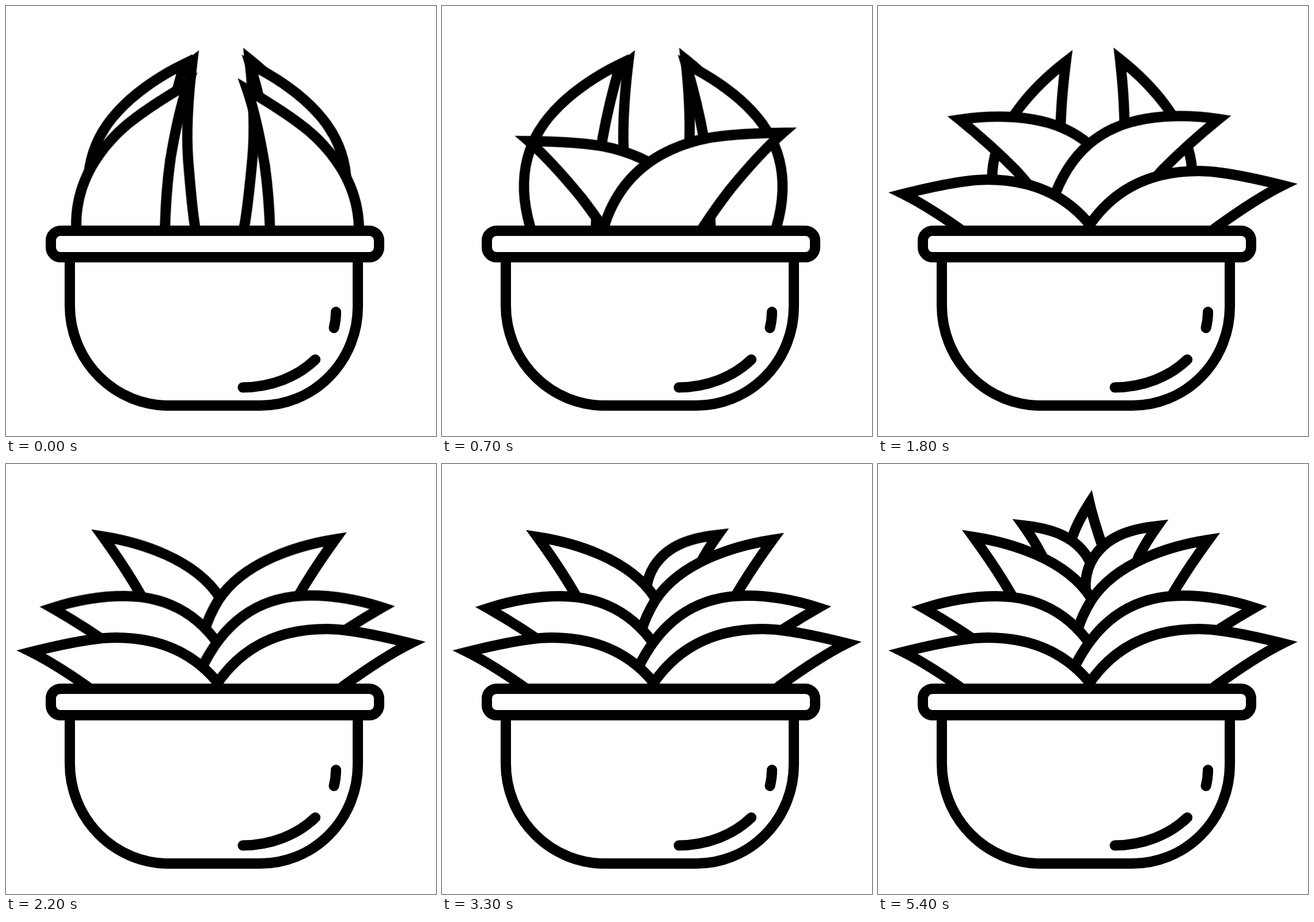
An HTML page without scripts that plays this animation: 748x748 px, repeating every 5500 ms.

```html
<!DOCTYPE html>
<html lang="en">
<head>
<meta charset="utf-8">
<title>Succulent</title>
<style>
  html, body { margin: 0; height: 100%; overflow: hidden; background: #fff; }
  svg {
    display: block; width: 100vw; height: 100vh;
    fill: #fff; stroke: #000; stroke-width: 18; stroke-miterlimit: 10;
  }
  .shine { fill: none; stroke-linecap: round; }

  /* Each tier holds its folded pose, bounces open, then rests. */
  .leaf {
    animation: 5.5s infinite;
    animation-timing-function: linear(
      0, .04 7.27%, .16 14.55%, .36 21.82%, .64 29.09%, 1 36.36%,
      .8906 40.91%, .8125 45.45%, .75 54.55%, .8125 63.64%, .8906 68.18%, 1 72.73%,
      .9531 77.27%, .9375 81.82%, .9531 86.36%, 1 90.91%, .9844 95.45%, 1);
  }
  .low  { --fold: -44.6deg; transform-origin: 295px 696px; animation-name: open-low; }
  .mid  { --fold: -43.8deg; transform-origin: 297px 604px; animation-name: open-mid; }
  .high { --fold: -29.2deg; transform-origin: 383px 596px; animation-name: open-high; }
  .left .low  { transform-origin: 295px 679px; }
  .left .high { --fold: -30deg; }

  .bud-right { --from: translate(-45px, 115px); animation-name: rise-right; }
  .bud-left  { --from: translate(-70px, 75px);  animation-name: rise-left; }
  .spike     { --from: translate(0, 115px);     animation-name: rise-spike; }

  @keyframes open-low {
    0%, 5.73% { transform: rotate(var(--fold)); }
    29.36%, 100% { transform: rotate(0deg); }
  }
  @keyframes open-mid {
    0%, 18.9% { transform: rotate(var(--fold)); }
    42%, 100% { transform: rotate(0deg); }
  }
  @keyframes open-high {
    0%, 32.36% { transform: rotate(var(--fold)); }
    53.2%, 100% { transform: rotate(0deg); }
  }
  @keyframes rise-right {
    0%, 47.27% { transform: var(--from); opacity: 0; }
    47.28% { opacity: 1; }
    66.36%, 100% { transform: translate(0, 0); opacity: 1; }
  }
  @keyframes rise-left {
    0%, 71.4% { transform: var(--from); opacity: 0; }
    71.41% { opacity: 1; }
    87.75%, 100% { transform: translate(0, 0); opacity: 1; }
  }
  @keyframes rise-spike {
    0%, 83.64% { transform: var(--from); opacity: 0; }
    83.65% { opacity: 1; }
    98.18%, 100% { transform: translate(0, 0); opacity: 1; }
  }
</style>
</head>
<body>
<svg viewBox="0 0 748 748">
  <defs>
    <path id="low" d="M704 312C640 296 590 287 558 287C480 287 412 315 366 384L330 450L420 540L500 462C530 433 560 407 590 384C630 355 670 329 704 312Z"/>
    <path id="mid" d="M655 250C612 236 572 229 530 229C453 229 390 262 346 345L325 395L380 460L428 425C452 402 475 382 498 363C510 350 525 336 543 322C580 295 620 270 655 250Z"/>
    <path id="high" d="M575 132C510 142 415 170 371 237C360 255 352 272 347 290L340 320L370 440L420 440L440 382C452 350 468 315 485 278C505 235 540 180 575 132Z"/>
    <path id="bud" d="M486 108C440 113 400 125 376 161C366 176 362 190 361 208L362 250L430 235L453 162C463 142 473 126 486 108Z"/>
  </defs>

  <path class="leaf spike" d="M368 68C357 85 346 104 338 127L330 160L400 170L388 136C380 112 373 90 368 68Z"/>

  <g class="left" transform="translate(739 -1) scale(-1 1)"><use href="#bud" class="leaf bud-left"/></g>
  <use href="#bud" class="leaf bud-right"/>

  <g class="left" transform="translate(741 -5) scale(-1 1)"><use href="#high" class="leaf high"/></g>
  <use href="#high" class="leaf high"/>

  <g class="left" transform="translate(735 1) scale(-1 1)"><use href="#mid" class="leaf mid"/></g>
  <use href="#mid" class="leaf mid"/>

  <g class="left" transform="translate(748 15) scale(-1 1)"><use href="#low" class="leaf low"/></g>
  <use href="#low" class="leaf low"/>

  <path d="M111 437V521A172 174 0 0 0 283 695H443A169 172 0 0 0 612 523V437Z"/>
  <rect x="78" y="391" width="571" height="46" rx="17"/>
  <path class="shine" d="M574 532Q574 546 570.5 560M412 663.5C462 663 507 645 538 615"/>
</svg>
</body>
</html>
```
